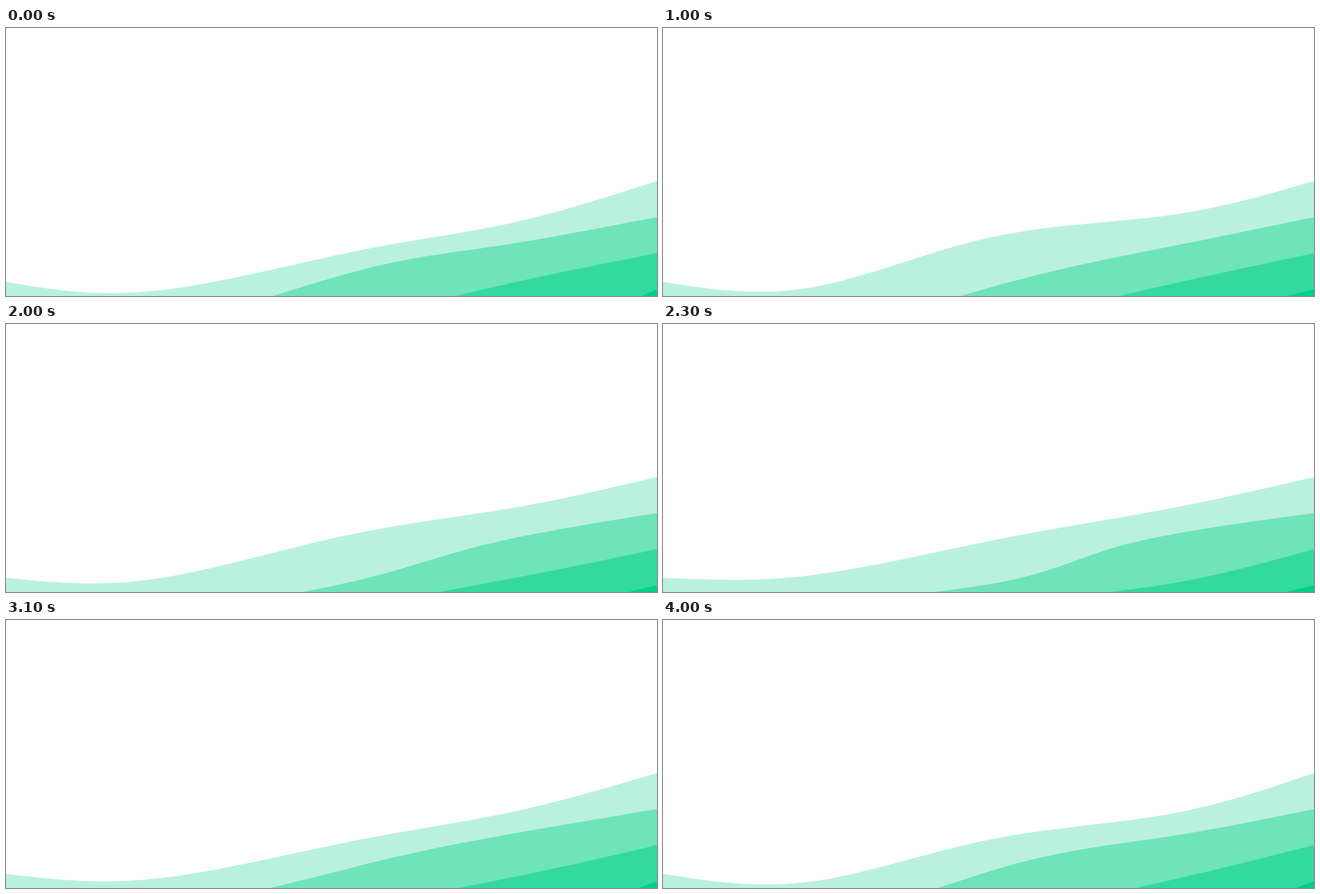
An HTML page that plays this animation: 1008 by 416 pixels, repeating every 4.1 s.

```html
<!DOCTYPE html>
<html lang="en">
<head>
<meta charset="utf-8">
<title>Waves</title>
<style>
  html, body { margin: 0; width: 100%; height: 100%; overflow: hidden; background: #fefefe; }
  svg { display: block; width: 1008px; height: 416px; }
</style>
</head>
<body>
<svg id="stage" viewBox="0 0 1008 416"></svg>
<script>
const W = 1008, H = 416, GAP = 56;
const LOOP = 4100, STEP = 100, BEAT = 1000, BEATS = 4;
const START = 3350;   // phase of the opening picture, before the cycle restarts
const SHIFT = 3500;   // phase of the first beat

// Each wave runs between fixed ends through a trough, a crest and a shoulder.
// A coordinate is constant, or has one value per beat.
const WAVES = [
  { color: '#baf1de',
    trough: [230, [412, 400, 405.5, 386]],
    crest: [[540, 470, 536, 505], [349, 333, 319, 340]],
    shoulder: [780, [306, 298, 284.5, 288]] },
  { color: '#6fe4b9',
    trough: [250, [462, 464, 465, 424]],
    crest: [540, [375, 385, 402, 396]],
    shoulder: [[770, 780, 780, 707], [338, 336.5, 344, 340]] },
  { color: '#34d99d',
    trough: [W / 4, 500],
    crest: [510, [463, 460, 459, 436]],
    shoulder: [770, [396.5, 418.5, 384, 411]] },
  { color: '#00d084',
    trough: [W / 4, 562],
    crest: [W / 2, 540],
    shoulder: [W * 3 / 4, [507, 475, 470, 470]] }
];

const stage = document.getElementById('stage');
for (const wave of WAVES) {
  wave.path = document.createElementNS('http://www.w3.org/2000/svg', 'path');
  wave.path.setAttribute('fill', wave.color);
  stage.appendChild(wave.path);
}

// Linear change from beat to beat
function valueAt(track, pos) {
  if (!Array.isArray(track)) return track;
  const i = Math.floor(pos), a = track[i], b = track[(i + 1) % BEATS];
  return a + (b - a) * (pos - i);
}

// Bezier controls of a natural cubic spline through five values
function natural(p) {
  const bend = i => 6 * (p[i - 1] - 2 * p[i] + p[i + 1]);
  const a = bend(1), b = bend(2), c = bend(3);
  const mid = (4 * b - a - c) / 14;
  const m = [0, (a - mid) / 4, mid, (c - mid) / 4, 0];
  return [0, 1, 2, 3].map(i => {
    const d = p[i + 1] - p[i];
    return [
      p[i] + (d - (2 * m[i] + m[i + 1]) / 6) / 3,
      p[i + 1] - (d + (m[i] + 2 * m[i + 1]) / 6) / 3,
      p[i + 1]
    ];
  });
}

function outline(points) {
  const xs = natural(points.map(p => p[0]));
  const ys = natural(points.map(p => p[1]));
  const curve = xs.map((x, i) =>
    'C' + x.map((v, j) => v.toFixed(2) + ',' + ys[i][j].toFixed(2)).join(' '));
  return `M${points[0]}${curve.join('')}V${2 * H}H0Z`;
}

function draw(time) {
  const t = Math.floor(time % LOOP / STEP) * STEP;
  const phase = t === 0 ? START : t;
  const pos = (phase - SHIFT + BEATS * BEAT) / BEAT % BEATS;
  WAVES.forEach(({ path, trough, crest, shoulder }, i) => {
    const knots = [trough, crest, shoulder].map(p => p.map(v => valueAt(v, pos)));
    const left = [0, 394 + GAP * i], right = [W, 237.5 + GAP * i];
    path.setAttribute('d', outline([left, ...knots, right]));
  });
}

const begin = performance.now();
function tick() {
  draw(performance.now() - begin);
  requestAnimationFrame(tick);
}
draw(0);
requestAnimationFrame(tick);
</script>
</body>
</html>
```
